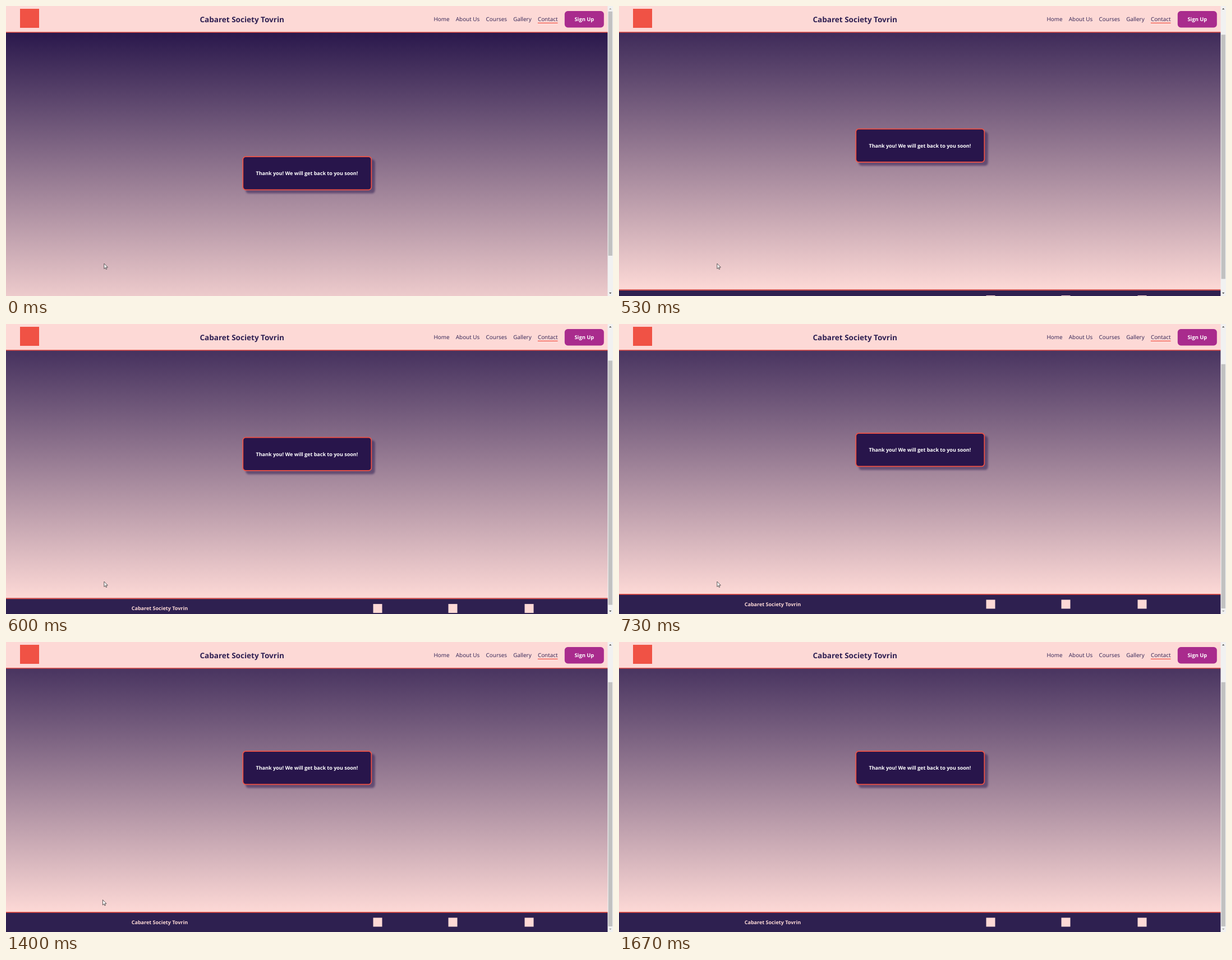
Recreate the animation shown at these times as an HTML page. Size 1082x518 px, loop 2.27 s.

```html
<!DOCTYPE html>
<html lang="en">
<head>
<meta charset="utf-8">
<title>Thank you</title>
<style>
  html, body { margin: 0; width: 100%; height: 100%; overflow: hidden; }
  svg { display: block; width: 100vw; height: 100vh; }
  text { font-family: "Open Sans", sans-serif; fill: #2e1f52; text-rendering: geometricPrecision; }
  .nav { font-size: 9.92px; }
  .bold { font-weight: 700; font-size: 9.02px; }
  .title { font-weight: 700; font-size: 13.52px; }
  .mid { text-anchor: middle; }
  .white { fill: #fff; }
  .pink { fill: #fdd9d6; }
  .red { fill: #f05245; }
</style>
</head>
<body>
<svg viewBox="0 0 1082 518">
  <defs>
    <linearGradient id="sky" x1="0" y1="0" x2="0" y2="1">
      <stop offset="0" stop-color="#2a184c"/>
      <stop offset="1" stop-color="#fdd9d6"/>
    </linearGradient>
    <filter id="blur"><feGaussianBlur stdDeviation="1.4"/></filter>
  </defs>

  <g id="page">
    <rect y="47" width="1073" height="509.5" fill="url(#sky)"/>
    <rect x="427.1" y="273.8" width="230.7" height="61" rx="5.6" fill="#29144e" opacity=".5" filter="url(#blur)"/>
    <rect x="422.3" y="269.1" width="229" height="59.2" rx="5" fill="#28154b" stroke="#f05245" stroke-width="1.7"/>
    <text class="bold white mid" x="536.4" y="302">Thank you! We will get back to you soon!</text>

    <rect y="556" width="1073" height="40" fill="#2e2050"/>
    <rect class="red" y="556" width="1073" height="1.6"/>
    <text class="bold pink mid" x="273.9" y="577.7">Cabaret Society Tovrin</text>
    <rect class="pink" x="654.5" y="566.5" width="16" height="16"/>
    <rect class="pink" x="788.5" y="566.5" width="16" height="16"/>
    <rect class="pink" x="924.5" y="566.5" width="16" height="16"/>
  </g>

  <g id="header">
    <rect class="pink" width="1073" height="46.4"/>
    <rect class="red" y="46.2" width="1073" height="1.4"/>
    <rect class="red" x="25" y="5" width="34" height="34"/>
    <text class="title mid" x="420.7" y="28.6">Cabaret Society Tovrin</text>
    <text class="nav" x="762.4" y="27.4">Home</text>
    <text class="nav" x="801.8" y="27.4">About Us</text>
    <text class="nav" x="855.6" y="27.4">Courses</text>
    <text class="nav" x="904.3" y="27.4">Gallery</text>
    <text class="nav" x="947.9" y="26.9">Contact</text>
    <rect class="red" x="947.9" y="29.8" width="35.6" height="1.2"/>
    <rect x="995.8" y="9" width="70" height="29.4" rx="5.6" fill="#a92b8d"/>
    <text class="bold white mid" x="1030.8" y="27.1" style="font-size:9.3px">Sign Up</text>
  </g>

  <g id="scrollbar">
    <rect x="1072.4" width="9.6" height="518" fill="#f1f1f1"/>
    <rect id="thumb" x="1073.6" y="9.8" width="7.3" height="436.2" fill="#c1c1c1"/>
    <path id="up" d="M1075 6.2h4.4l-2.2-2.4z"/>
    <path id="down" d="M1075 511.8h4.4l-2.2 2.4z"/>
  </g>

  <g id="cursor">
    <path transform="scale(.56)" d="M.5.5V17L4.3 13.4 6.7 19 9.2 17.9 6.8 12.4H12Z" fill="#fff" stroke="#111" stroke-width="1.2"/>
  </g>
</svg>
<script>
const LOOP = 2270, MAX_SCROLL = 74, THUMB_TRAVEL = 62;

// [start ms, scroll offset]
const scrollSteps = [[0, 0], [470, 20], [530, 49.5], [600, 66.4], [670, 72], [730, MAX_SCROLL]];
// [start ms, x, y]
const cursorSteps = [
  [0, 174.6, 459.8], [1400, 172.2, 460.3], [1470, 162, 467],
  [1540, 132, 485], [1600, 84, 510], [1670, 60, 540]
];

const el = id => document.getElementById(id);
const page = el("page"), thumb = el("thumb"), cursor = el("cursor");
const stepAt = (steps, t) => steps.filter(s => s[0] <= t).pop();
const move = (node, x, y) => node.setAttribute("transform", `translate(${x} ${y})`);
const arrowColor = active => active ? "#505050" : "#a3a3a3";

function draw(t) {
  const scroll = stepAt(scrollSteps, t)[1];
  const [, x, y] = stepAt(cursorSteps, t);
  move(page, 0, -scroll);
  move(thumb, 0, scroll / MAX_SCROLL * THUMB_TRAVEL);
  move(cursor, x, y);
  el("up").setAttribute("fill", arrowColor(scroll > 0));
  el("down").setAttribute("fill", arrowColor(scroll < MAX_SCROLL));
}

function tick() {
  draw(performance.now() % LOOP);
  requestAnimationFrame(tick);
}
tick();
</script>
</body>
</html>
```
